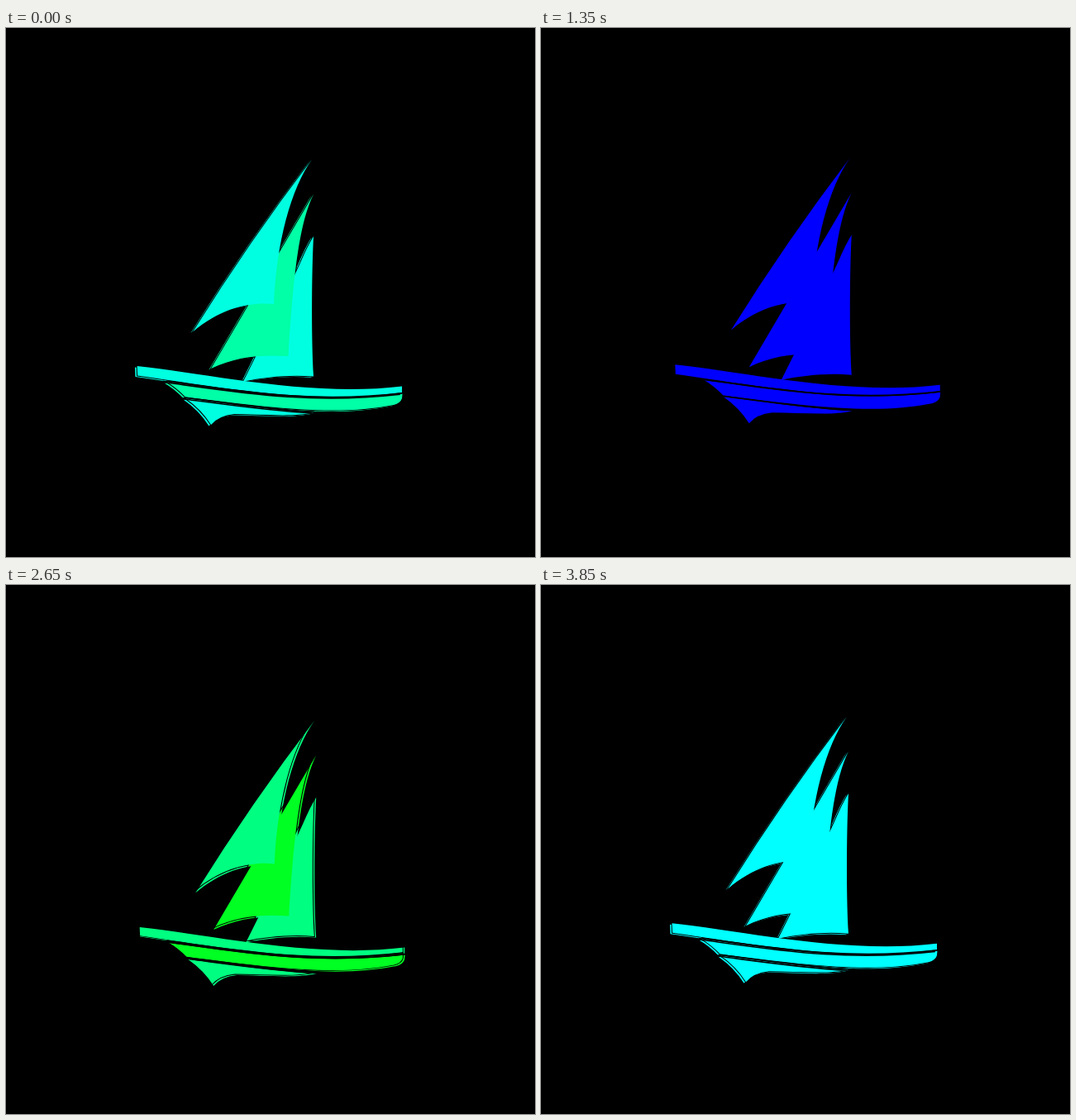
Write an HTML page with a canvas that moves like this. It is 640 px wide and 640 px high and loops after 3900 ms.

```html
<!DOCTYPE html>
<html lang="en">
<head>
<meta charset="utf-8">
<title>Sailing boat</title>
<style>
  html, body { margin: 0; width: 100%; height: 100%; overflow: hidden; background: #000; }
  canvas { display: block; width: 640px; height: 640px; }
</style>
</head>
<body>
<canvas id="stage" width="640" height="640"></canvas>
<script>
const LOOP = 3900, STEP = 50, RADIUS = 4;
const ctx = document.getElementById('stage').getContext('2d');

// Back to front; tone 0 is the main colour, tone 1 the accent.
const parts = [
  [0, 'M373 253 C371 290 370 370 373 422.5 C345 420 315 423 288 428.5 Q325 355 357 285 Q366 264 373 253Z'],
  [1, 'M373 202 C357 235 349 290 342.5 398 C310 396 280 398 249 413Z'],
  [0, 'M371 160 C346 195 328 260 325 335 C300 332 262 338 227 368.5 Q296 258 371 160Z'],
  [0, 'M159.5 410 C245 419 370 448 480 434.5 V442 C370 458 245 433 160 421.5Z'],
  [1, 'M195 429 C290 442 372 456 480.5 443.5 L480 449 Q478 455 470 457 C400 471 320 460 218 447.5 Q207 436 195 429Z'],
  [0, 'M218 449 Q237 462 249 481 Q258 470 277 468 C310 468 350 472 374 466 C320 463 270 455 218 449Z']
].map(([tone, d]) => ({ tone, path: new Path2D(d) }));

const seams = new Path2D(
  'M195 428 C290 441 372 455 480.5 442.7 M218 448.2 C270 455 320 462.5 374 465.5');

// time, main hue, accent hue
const hues = [
  [0, 173, 159], [650, 240, 240], [1350, 240, 240], [2000, 120, 120],
  [2650, 150, 128], [3450, 240, 208], [3850, 180, 180], [3900, 173, 159]
];

function colorsAt(t) {
  const i = hues.findIndex(h => h[0] > t);
  const a = hues[i - 1], b = hues[i];
  const k = (t - a[0]) / (b[0] - a[0]);
  return [1, 2].map(n => `hsl(${a[n] + (b[n] - a[n]) * k}, 100%, 50%)`);
}

function onCircle(angle, radius, draw) {
  ctx.save();
  ctx.translate(0.5 - radius * Math.cos(angle), 0.5 - radius * Math.sin(angle));
  draw();
  ctx.restore();
}

function fillParts(colors) {
  for (const p of parts) {
    ctx.fillStyle = colors[p.tone];
    ctx.fill(p.path);
  }
}

function strokeParts() {
  ctx.lineWidth = 2;
  for (const p of parts) ctx.stroke(p.path);
}

function strokeSeams() {
  ctx.lineWidth = 1.6;
  ctx.stroke(seams);
}

// How the outlined second layer is laid over the boat, if at all.
function overlayAt(t) {
  if (t < 300 || t >= 3600 || (t >= 1700 && t < 2250)) return 'source-over';
  return t >= 2250 && t < 3000 ? 'source-atop' : null;
}

function render(t) {
  const angle = t / LOOP * Math.PI * 2;
  const colors = colorsAt(t);
  const overlay = overlayAt(t);
  ctx.clearRect(0, 0, 640, 640);
  onCircle(angle, RADIUS, () => fillParts(colors));
  if (overlay) {
    ctx.globalCompositeOperation = overlay;
    onCircle(angle + Math.PI / 4, RADIUS / 2, () => {
      strokeParts();
      fillParts(colors);
      strokeSeams();
    });
    ctx.globalCompositeOperation = 'source-over';
  }
  onCircle(angle, RADIUS, strokeSeams);
}

let start;
function tick(now) {
  start ??= now;
  render(Math.floor((now - start) % LOOP / STEP) * STEP);
  requestAnimationFrame(tick);
}
render(0);
requestAnimationFrame(tick);
</script>
</body>
</html>
```
